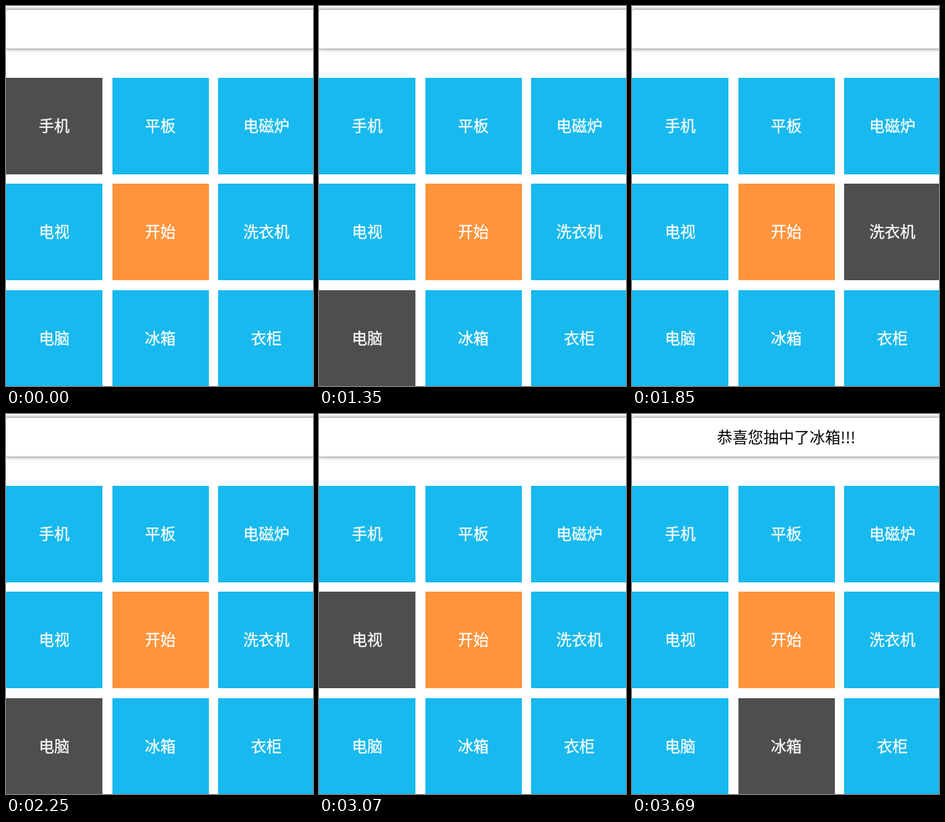
Write an HTML page that moves like this. It is 398 px wide and 492 px high and loops after 4260 ms.

```html
<!DOCTYPE html>
<html lang="zh-CN">
<head>
<meta charset="utf-8">
<title>抽奖</title>
<style>
  html, body { margin: 0; width: 100%; height: 100%; overflow: hidden; background: #fff; }
  #stage { position: relative; width: 398px; height: 492px; overflow: hidden; }
  #banner { position: absolute; left: 0; top: 5px; width: 400px; height: 50px;
            border-radius: 3px; background: #fff; box-shadow: 0 0 5px 1px #888; }
  svg { position: absolute; left: 0; top: 0; display: block; }
  text { font: 20px "Noto Sans CJK SC", "Noto Sans CJK", sans-serif; text-anchor: middle; }
  #grid text { fill: #fff; stroke: #fff; stroke-width: .25px; }
</style>
</head>
<body>
<div id="stage">
  <div id="banner"></div>
  <svg width="398" height="492" viewBox="0 0 398 492">
    <g id="grid"></g>
    <text id="message" x="200" y="38"></text>
  </svg>
</div>
<script>
const LOOP = 4260;
const BLUE = '#17b9ee', ORANGE = '#ff943c', DARK = '#4e4e4e';
const LABELS = ['手机', '平板', '电磁炉', '电视', '开始', '洗衣机', '电脑', '冰箱', '衣柜'];
const SIZE = 125, PITCH = 137.5, GRID_TOP = 93, CENTER = 4;
const LAST_STEP = 29;

// The highlight advances about every 100 ms; pairs of [time, step] set its pace.
const PACE = [[860, 1], [1350, 6], [1850, 11], [2460, 17], [2590, 18], [3070, 23], [3690, LAST_STEP]];

const grid = document.getElementById('grid');
const message = document.getElementById('message');

function add(tag, attributes) {
  const node = document.createElementNS('http://www.w3.org/2000/svg', tag);
  for (const key in attributes) node.setAttribute(key, attributes[key]);
  return grid.appendChild(node);
}

const tiles = LABELS.map((label, i) => {
  const col = i % 3, row = Math.floor(i / 3);
  const x = Math.ceil(col * PITCH), y = GRID_TOP + Math.floor(row * PITCH);
  const tile = add('rect', { x, y, width: SIZE, height: SIZE });
  add('text', { x: col * PITCH + SIZE / 2, y: y + 70 }).textContent = label;
  return tile;
});

// Tile at a given step, walking clockwise around the center.
function tileAt(step) {
  const side = Math.floor(step / 2) % 4, offset = step % 2;
  return [offset, 2 + 3 * offset, 8 - offset, 6 - 3 * offset][side];
}

function stepAt(time) {
  if (time < PACE[0][0]) return 0;
  const next = PACE.findIndex(([t]) => t > time);
  if (next < 0) return LAST_STEP;
  const [t0, s0] = PACE[next - 1], [t1, s1] = PACE[next];
  return Math.floor(s0 + (s1 - s0) * (time - t0) / (t1 - t0));
}

function render(time) {
  const step = stepAt(time), active = tileAt(step);
  tiles.forEach((tile, i) => {
    tile.setAttribute('fill', i === active ? DARK : i === CENTER ? ORANGE : BLUE);
  });
  message.textContent = step === LAST_STEP ? `恭喜您抽中了${LABELS[active]}!!!` : '';
}

const start = performance.now();
function tick() {
  render((performance.now() - start) % LOOP);
  requestAnimationFrame(tick);
}
tick();
</script>
</body>
</html>
```
